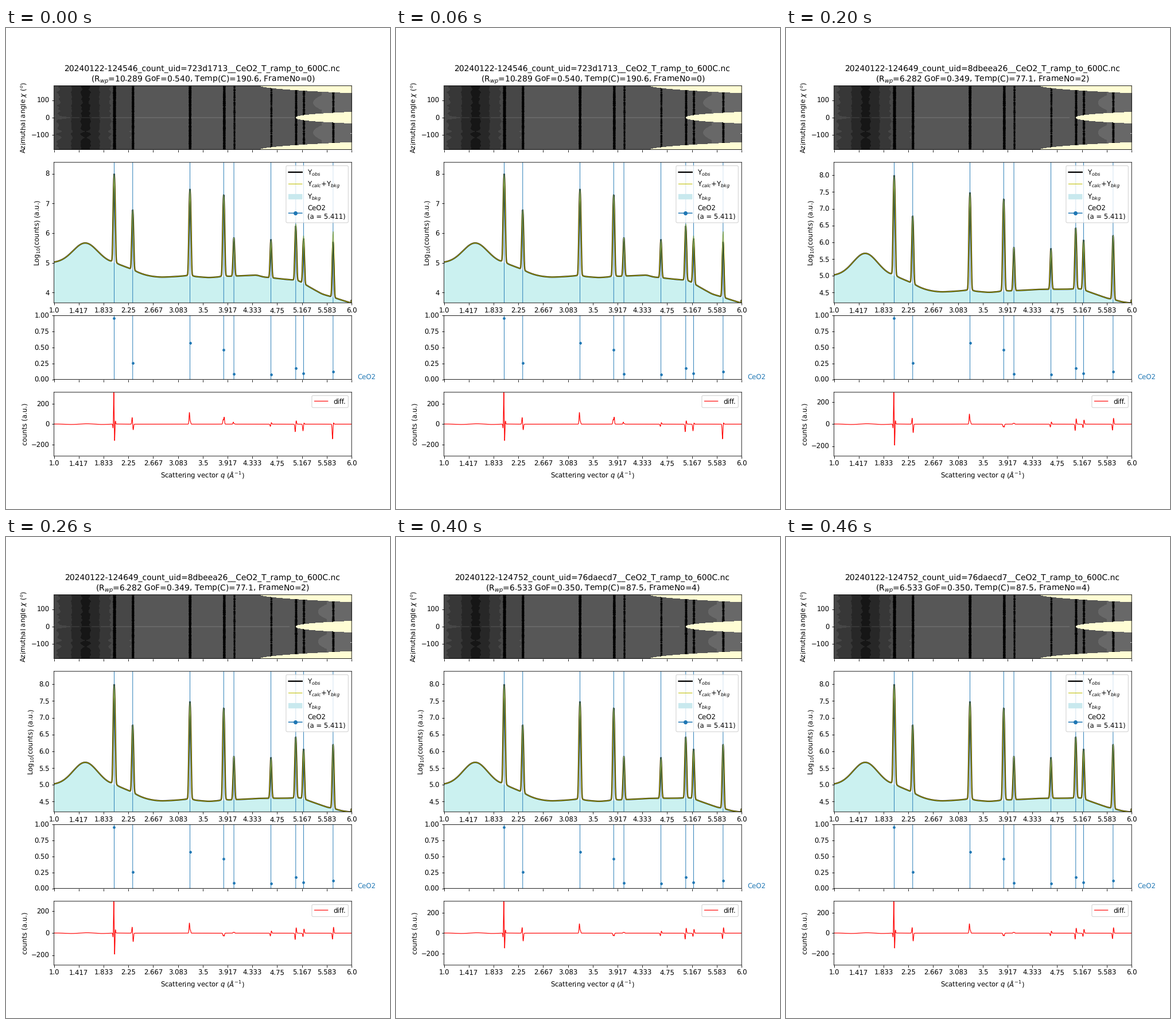
Recreate the animation shown at these times as a matplotlib script. Size 669 px wide and 837 px high, loop 500 ms.

```python
import numpy as np
import matplotlib.pyplot as plt
from matplotlib.animation import FuncAnimation
from matplotlib.lines import Line2D
from matplotlib.patches import Patch

# Soft, unsnapped rendering
plt.rcParams.update({
    "font.size": 9.96, "text.hinting": "none", "path.snap": False,
    "axes.linewidth": 0.74, "xtick.major.width": 0.74,
    "ytick.major.width": 0.74})

DPI = 84
LATTICE = 5.411
PX = 1 / 103.7                      # one screen pixel in units of q
BLUE = "tab:blue"
MASK = np.array([255, 253, 212]) / 255

peaks = 2 * np.pi / LATTICE * np.sqrt([3, 4, 8, 11, 12, 16, 19, 20, 24])
heights = np.array([0.955, 0.26, 0.57, 0.465, 0.085, 0.08, 0.175, 0.095, 0.12])
counts = heights * np.where(peaks > 5.1, 3500, 2950)
ticks = np.linspace(1, 6, 13)
q = np.linspace(1, 6, 2600)

# stamp, uid, Rwp, GoF, temperature, extremes of the residual
scans = [
    ("124546", "723d1713", "10.289", "0.540", "190.6", 313, -165),
    ("124618", "fe295dca", "6.794", "0.365", "72.0", 277, -207),
    ("124649", "8dbeea26", "6.282", "0.349", "77.1", 290, -195),
    ("124720", "efbf2cfd", "6.373", "0.342", "82.4", 277, -165),
    ("124752", "76daecd7", "6.533", "0.350", "87.5", 313, -150),
]

# Baseline key points (q, log counts), then the tail of the hot and cool scans
plateau = [(1, 4.5), (2.8, 4.5), (3.2, 4.555), (3.6, 4.5), (4.4, 4.59)]
hot_tail = [(4.52, 4.52), (5.1, 4.4), (5.5, 3.95), (6, 3.64)]
cool_tail = [(5.15, 4.6), (5.6, 4.32), (5.85, 4.215), (6, 4.18)]

# Residual left and right of every peak but the first
hot_sides = ([66, 115, 45, 20, -22, -74, -66, -145],
             [-56, 25, 68, 4, 15, 34, 12, 14])
cool_sides = ([56, 92, -24, 8, -26, -58, -32, -55],
              [-78, 26, -26, 8, 20, 50, 38, 55])


def smooth(y, width):
    pad = np.pad(y, width, mode="reflect", reflect_type="odd")
    kernel = np.hanning(2 * width + 1)
    return np.convolve(pad, kernel / kernel.sum(), "valid")


def background(x, tail):
    base = np.interp(x, *np.array(plateau + tail).T)
    base = smooth(base, int(0.08 / (x[1] - x[0])))
    step = 0.5 / (1 + np.exp((x - 2.33) / 0.14))
    return base + step + 0.67 * np.exp(-((x - 1.525) / 0.29) ** 2)


def profile(base, amps):
    """Log counts of background plus pseudo-Voigt peaks."""
    total = np.exp(base)
    for p, amp in zip(peaks, amps):
        u = (q - p) / PX
        total = total + amp * (0.985 * np.exp(-u**2 / 2.6) + 0.015 / (1 + u**2 / 3))
    log = np.log(total)
    log[-4:] += 0.09
    return log


def residual(i):
    up, down = scans[i][5:]
    left, right = hot_sides if i == 0 else cool_sides
    y = 4 * np.cos(2 * np.pi * (q - 1.55) / 0.55) * np.exp(-((q - 1.55) / 0.5) ** 2)

    def lobe(p, shift, amp, width):
        return amp * np.exp(-(((q - p) / PX - shift) / width) ** 2 / 2)

    for shift, amp in (-2, -0.13 * up), (-0.7, up), (0.7, down), (2.2, 30):
        y = y + lobe(peaks[0], shift, amp, 0.45)
    for p, a, b in zip(peaks[1:], left, right):
        y = y + lobe(p, -1, a, 0.65) + lobe(p, 0.8, b, 0.65)
    return y


def detector(i):
    """Azimuthal map: dark where counts are high, banded greys, masked corners."""
    rng = np.random.default_rng(4)
    rows, cols = 111, 518
    x = np.linspace(1, 6, cols)
    chi = np.linspace(183, -183, rows)[:, None]
    wave = smooth(rng.normal(0, 0.035, rows), 4)[:, None]
    bow = 0.06 + np.clip(0.1 * ((np.abs(chi) - 85) / 45) ** 2, 0, 0.09)
    if i == 0:
        bow = bow - 0.05
    log = background(x, cool_tail) + np.where(x > 4.95, bow, wave * (x < 2.4))

    total = np.exp(log)
    for p, amp in zip(peaks, counts):
        grain = np.exp(rng.normal(0, 0.5, (rows, 1)))
        total = total + 2 * amp * grain * np.exp(-((x - p) / PX) ** 2 / 1.6)
    log = np.log(total)

    seam = np.abs(chi) < 1.8 + 9 * np.exp(-((x - 1) / 0.15) ** 2)
    log = log - 0.25 * (seam & (x < 5.05))
    level = np.clip(np.floor(7.95 - 3.5 * (log - 4.5)), 0, 8)
    grey = np.clip(0.345 - 0.064 * (7 - level), 0, 1)
    rgb = np.repeat(grey[..., None], 3, axis=2)

    edge = 43 * np.clip((x - 4.455) / 1.545, 0, 1) ** 0.55
    wedge = 32 * np.clip((x - 5.06) / 0.94, 0, 1) ** 0.45
    rgb[(np.abs(chi) > 183 - edge) | (np.abs(chi) < wedge)] = MASK
    rgb[(np.abs(chi + 90) < 3) & (x > 5.98)] = 1
    return rgb


def title(i):
    stamp, uid, rwp, gof, temp = scans[i][:5]
    return (f"20240122-{stamp}_count_uid={uid}__CeO2_T_ramp_to_600C.nc\n"
            f"(R$_{{wp}}$={rwp} GoF={gof}, Temp(C)={temp}, FrameNo={i})")


fig = plt.figure(figsize=(669.01 / DPI, 837.01 / DPI), dpi=DPI)
grid = fig.add_gridspec(5, 1, hspace=0.2)
ax_map, ax_fit, ax_ref, ax_diff = (
    fig.add_subplot(grid[s]) for s in (0, slice(1, 3), 3, 4))

for ax in (ax_map, ax_fit, ax_ref, ax_diff):
    ax.set_xlim(1, 6)
    ax.set_xticks(ticks)
    if ax in (ax_map, ax_ref):
        ax.tick_params(labelbottom=False)
    else:
        ax.set_xticklabels([str(round(t, 3)) for t in ticks])

image = ax_map.imshow(detector(0), extent=(1, 6, -183, 183), aspect="auto",
                      interpolation="nearest")
ax_map.set_yticks([-100, 0, 100])
ax_map.set_ylabel(r"Azimuthal angle $\chi$ ($^{o}$)")

fill, = ax_fit.fill([1, 6, 6], [0, 0, 1], color="#cbf1f0", lw=0, zorder=1)
obs, = ax_fit.plot([], [], "k", lw=2)
calc, = ax_fit.plot([], [], "y", lw=0.9)
ax_fit.set_ylabel("Log$_{10}$(counts) (a.u.)")

for p, h in zip(peaks, heights):
    ax_fit.axvline(p, color=BLUE, lw=0.8)
    ax_ref.axvline(p, color=BLUE, lw=0.8)
ax_ref.plot(peaks, heights, "o", color=BLUE, ms=3)
ax_ref.set_ylim(0, 1)
ax_ref.set_yticks(np.linspace(0, 1, 5))
ax_ref.text(1.02, 0, "CeO2", color=BLUE, transform=ax_ref.transAxes)

ax_fit.legend(
    [Line2D([], [], color="k", lw=2), Line2D([], [], color="y", lw=0.9),
     Patch(color="#c9e9ee"),
     Line2D([], [], color=BLUE, lw=1.3, marker="o", ms=5)],
    ["Y$_{obs}$", "Y$_{calc}$+Y$_{bkg}$", "Y$_{bkg}$",
     f"CeO2\n(a = {LATTICE})"], loc="upper right")

diff, = ax_diff.plot([], [], "r", lw=1, label="diff.")
ax_diff.set_yticks([-200, 0, 200])
ax_diff.set_ylabel("counts (a.u.)")
ax_diff.set_xlabel(r"Scattering vector $q$ ($\AA^{-1}$)")
ax_diff.legend(loc="upper right")


def update(i):
    hot = i == 0
    base = background(q, hot_tail if hot else cool_tail)
    # The hot scan loses intensity towards high q, the model less so
    seen = counts * (1 - 0.4 * hot * np.clip(peaks - 4.65, 0, 1))
    model = counts * np.where(hot & (peaks > 4.7), 0.9, 1)

    ax_map.set_title(title(i))
    image.set_data(detector(i))
    fill.set_xy(np.column_stack([np.r_[1, q, 6], np.r_[0, base, 0]]))
    obs.set_data(q, profile(base, seen))
    calc.set_data(q, profile(base, model))
    ax_fit.set_ylim(3.651 if hot else 4.19, 8.387)
    ax_fit.set_yticks(np.arange(4, 9) if hot else np.arange(4.5, 8.1, 0.5))
    diff.set_data(q, residual(i))
    ax_diff.set_ylim(-scans[i][5], scans[i][5])
    return image, fill, obs, calc, diff


anim = FuncAnimation(fig, update, frames=len(scans), interval=100,
                     init_func=lambda: update(0), repeat=True, repeat_delay=0)
plt.show()
```
